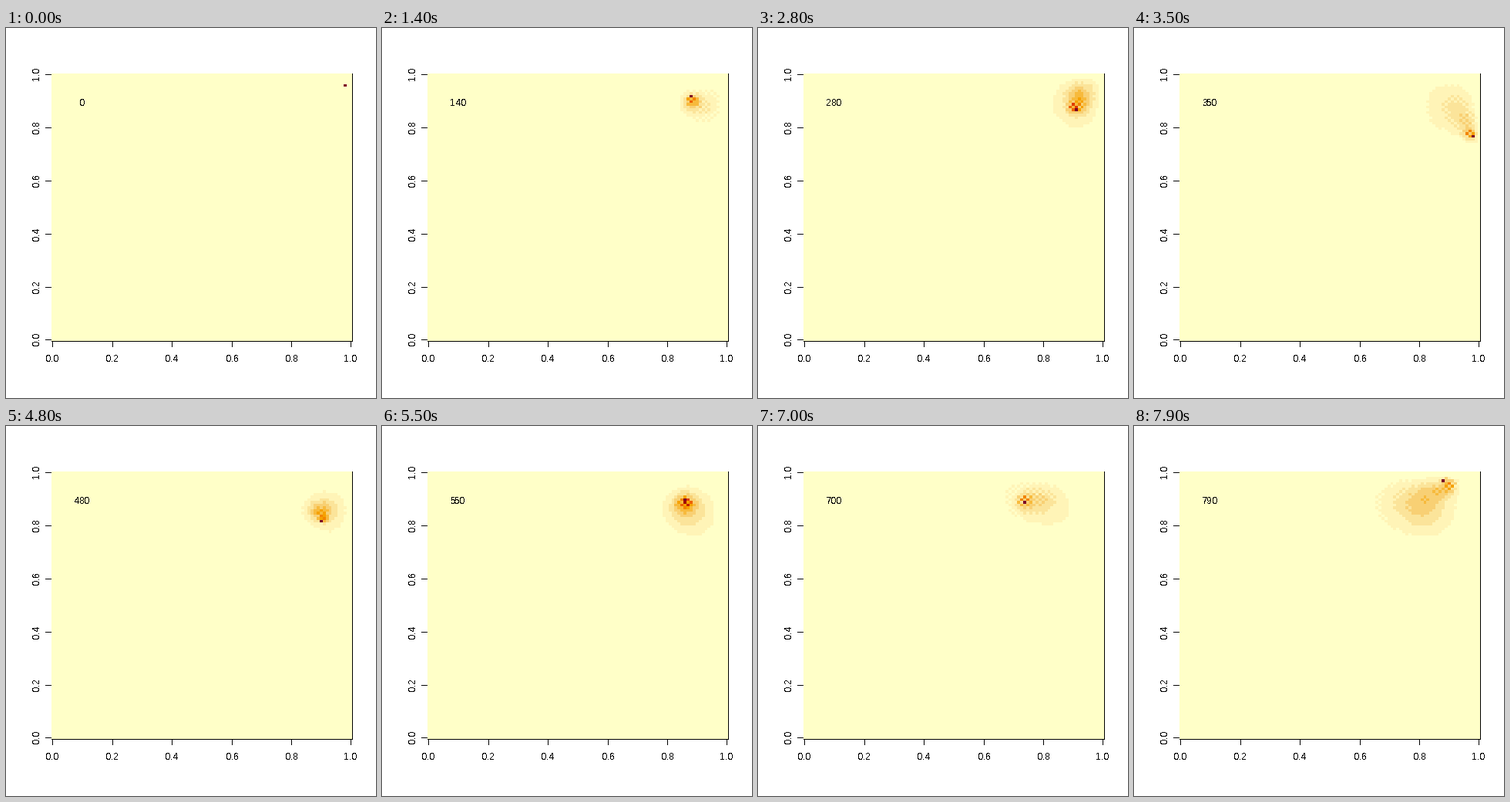
Animation of 480x480 px, one loop 8000 ms. Source, as a matplotlib script:

```python
import numpy as np
import matplotlib.pyplot as plt
from matplotlib.animation import FuncAnimation

SIZE, DPI, FRAMES, CELLS = 480, 100, 80, 100
STEPS = 10      # simulation steps per frame
KEEP = 0.997    # share of the trail left after each step
LEFT, RIGHT, TOP, BOTTOM = 59.04, 449.76, 59.04, 406.56

# Way points of the walker: frame, column, row from the top
WAY = [(0, 97, 4), (14, 87, 8), (21, 98, 11), (28, 90, 13), (35, 97, 23),
       (48, 89, 18), (56, 85, 15), (62, 70, 11), (72, 77, 12), (79, 87, 3)]

plt.rcParams.update({
    "font.family": "Liberation Sans",
    "font.size": 12 * 72 / DPI,
    "text.hinting": "force_autohint",
    "text.hinting_factor": 1,
    "text.antialiased": False,
})


def palette(n):
    """Yellow-orange-red scale, computed in polar LUV."""
    i = np.linspace(0, 1, n)
    k, peak = i ** 1.6, 1 / (1 + 105 / 140)
    hue = np.radians(85 - 80 * i)
    chroma = np.where(k <= peak, 40 + 140 * k / peak,
                      180 - 105 * (k - peak) / (1 - peak))
    lum = 99 - 74 * i ** 1.3
    y = ((lum + 16) / 116) ** 3
    u = chroma * np.cos(hue) / (13 * lum) + 0.1978398
    v = chroma * np.sin(hue) / (13 * lum) + 0.4683363
    x = 9 * y * u / (4 * v)
    z = y * (12 - 3 * u - 20 * v) / (4 * v)
    to_rgb = np.array([[3.240479, -1.537150, -0.498535],
                       [-0.969256, 1.875992, 0.041556],
                       [0.055648, -0.204043, 1.057311]])
    lin = np.clip(to_rgb @ np.array([x, y, z]), 0, 1).T
    rgb = np.where(lin > 0.00304, 1.055 * lin ** (1 / 2.4) - 0.055, 12.92 * lin)
    return np.round(255 * rgb).astype(np.uint8)


def walk(seed=12):
    """Random walk on the grid, pinned to the way points."""
    rng = np.random.default_rng(seed)
    path = [np.array([WAY[0][1:]])]
    for (t0, *a), (t1, *b) in zip(WAY[:-1], WAY[1:]):
        n = (t1 - t0) * STEPS
        t = np.arange(1, n + 1)[:, None] / n
        drift = rng.integers(-1, 2, (n, 2)).cumsum(axis=0)
        path.append(a + np.subtract(b, a) * t + drift - drift[-1] * t)
    return np.clip(np.round(np.vstack(path)), 1, CELLS - 2).astype(int)


def simulate():
    """Each step spreads the trail to four neighbours and adds one drop."""
    z = np.zeros((CELLS, CELLS))
    fields = []
    for step, (col, row) in enumerate(walk()):
        spread = np.zeros_like(z)   # the border absorbs everything
        spread[1:-1, 1:-1] = (z[:-2, 1:-1] + z[2:, 1:-1]
                              + z[1:-1, :-2] + z[1:-1, 2:]) / 4
        z = KEEP * spread
        z[row, col] += 1
        if step % STEPS == 0:
            fields.append(np.minimum(12 * z / z.max(), 11).astype(int))
    return fields


def span(lo, hi):
    """Pixel range between two edges and the cell under each pixel."""
    px = np.arange(int(lo), int(hi))
    cell = ((px + 0.5 - lo) * CELLS / (hi - lo)).astype(int)
    return slice(px[0], px[-1] + 1), np.clip(cell, 0, CELLS - 1)


PALETTE = palette(12)
FIELDS = simulate()
X_SPAN, X_CELL = span(LEFT, RIGHT)
Y_SPAN, Y_CELL = span(TOP, BOTTOM)

fig = plt.figure(figsize=(SIZE / DPI, SIZE / DPI), dpi=DPI, facecolor="white")
ax = fig.add_axes([0, 0, 1, 1])
ax.set_axis_off()

canvas = np.full((SIZE, SIZE, 3), 255, np.uint8)
canvas[59:407, 449] = 0
canvas[406, 59:450] = 0
for v in np.linspace(0, 1, 6):
    x = int(LEFT + (RIGHT - LEFT) * (0.5 + 99 * v) / CELLS)
    y = int(BOTTOM - (BOTTOM - TOP) * (0.5 + 99 * v) / CELLS)
    canvas[406:414, x] = 0
    canvas[y, 51:59] = 0
    ax.text(x, 433, f"{v:.1f}", ha="center", va="baseline")
    ax.text(43, y, f"{v:.1f}", ha="center", va="baseline",
            rotation=90, rotation_mode="anchor")

image = ax.imshow(canvas, extent=(0, SIZE, SIZE, 0), aspect="auto",
                  interpolation="nearest")
ax.set(xlim=(0, SIZE), ylim=(SIZE, 0))
counter = ax.text(98.5, 101, "0", ha="center", va="baseline")


def update(i):
    picture = canvas.copy()
    picture[Y_SPAN, X_SPAN] = PALETTE[FIELDS[i][np.ix_(Y_CELL, X_CELL)]]
    image.set_data(picture)
    counter.set_text(str(STEPS * i))
    return image, counter


anim = FuncAnimation(fig, update, frames=FRAMES, interval=100,
                     repeat=True, repeat_delay=0)
plt.show()
```
